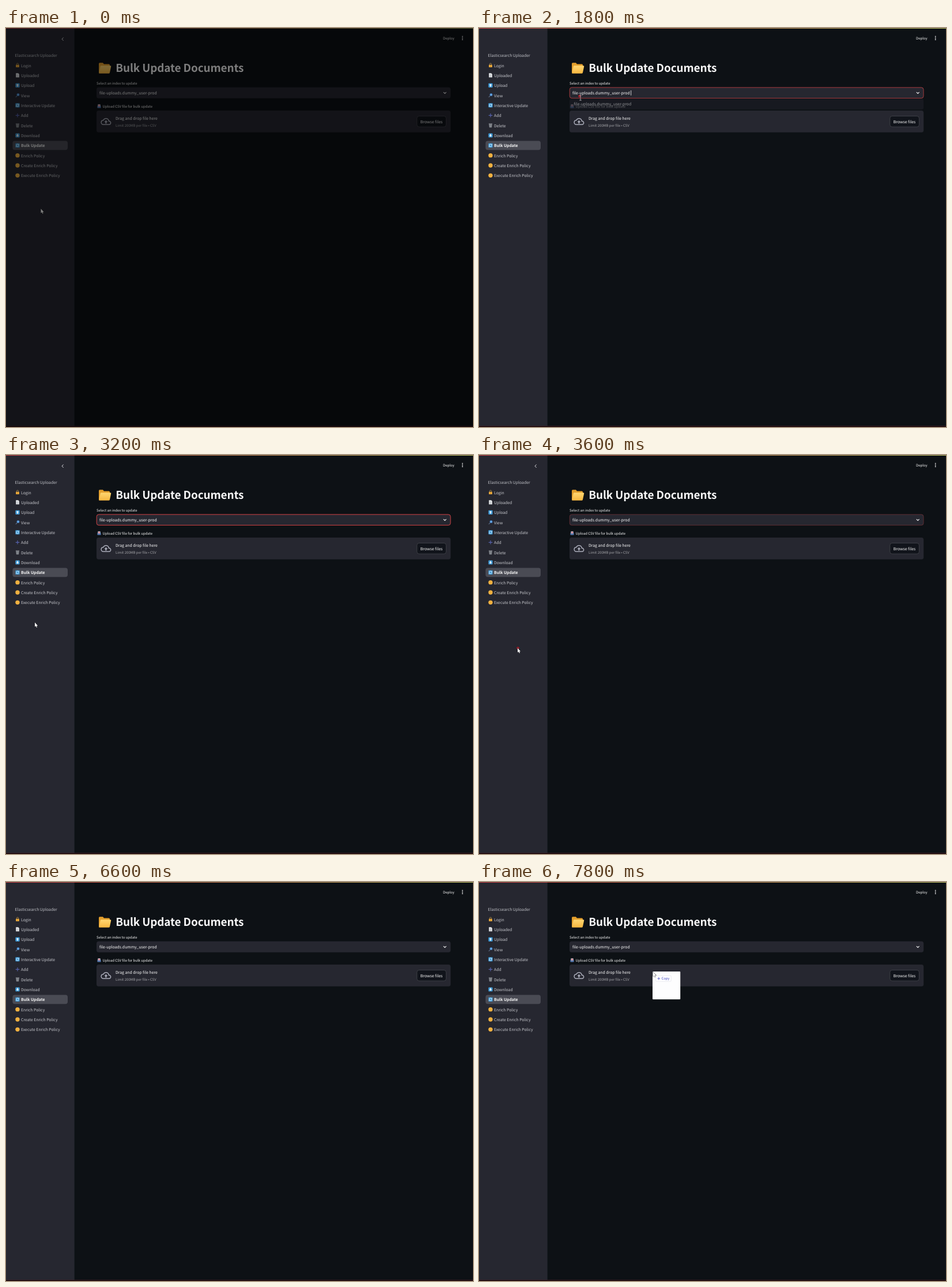
An HTML page with a canvas for the animation above (8000 ms loop, 810 by 691 pixels).

```html
<!DOCTYPE html>
<html lang="en">
<head>
<meta charset="utf-8">
<title>Bulk Update Documents</title>
<style>
html, body { margin: 0; width: 100%; height: 100%; overflow: hidden; background: #0d1115; }
canvas { display: block; width: 810px; height: 691px; }
</style>
</head>
<body>
<canvas id="stage" width="810" height="691"></canvas>
<script>
const ctx = document.getElementById('stage').getContext('2d');
const LOOP = 8000, STEP = 200;
const BG = '#0d1115', PANEL = '#262730', WHITE = '#fafafa', RED = '#ff4b4b';
const FAMILY = '"Noto Sans CJK JP", "Noto Sans CJK SC", "Noto Sans CJK", "Noto Sans", sans-serif';
const BODY = 7.68, SMALL = 6.72, TITLE = 21.1;
const INDEX = 'file-uploads.dummy_user-prod';
const MENU = [
  ['lock', 'Login'], ['page', 'Uploaded'], ['up', 'Upload'], ['lens', 'View'],
  ['sync', 'Interactive Update'], ['plus', 'Add'], ['bin', 'Delete'], ['down', 'Download'],
  ['sync', 'Bulk Update'], ['dot', 'Enrich Policy'], ['dot', 'Create Enrich Policy'],
  ['dot', 'Execute Enrich Policy']
];
const ACTIVE = 8;

// time, x, y of the pointer tip
const POINTER = [
  [0, 60.5, 313], [400, 60.5, 313], [600, 64, 304], [1000, 100, 236],
  [1400, 160, 136], [1600, 174, 119], [1800, 176, 121], [2200, 177, 117],
  [2400, 179.5, 112.5], [2600, 150, 150], [2800, 70, 208], [3200, 50, 290],
  [3600, 67, 334.5], [4000, 62, 348], [4200, 38, 346], [4400, 13, 342]
];
const DRAG = [[6800, 150, 174], [7000, 287, 134], [7400, 293, 141], [7600, 299, 151], [7800, 301, 155]];
const CLICKS = [[1800, 174.5, 118], [2200, 174.5, 119.5], [3600, 67.5, 334.5]];

function at(keys, t) {
  let i = keys.findIndex(k => k[0] > t);
  if (i < 0) i = keys.length;
  const a = keys[i - 1], b = keys[i] || a;
  const p = a === b ? 0 : (t - a[0]) / (b[0] - a[0]);
  return [a[1] + (b[1] - a[1]) * p, a[2] + (b[2] - a[2]) * p];
}

function text(str, x, y, size, color = WHITE, weight = 400) {
  // the CJK family draws its Latin letters about 1.117 times larger per em
  ctx.font = `${weight} ${size / 1.117}px ${FAMILY}`;
  ctx.textRendering = 'geometricPrecision';
  ctx.fillStyle = color;
  ctx.fillText(str, x, y);
}

function rect(x, y, w, h, color, r = 0) {
  ctx.fillStyle = color;
  ctx.beginPath();
  ctx.roundRect(x, y, w, h, r);
  ctx.fill();
}

function frame(x, y, w, h, color, r) {
  ctx.strokeStyle = color;
  ctx.lineWidth = 0.8;
  ctx.beginPath();
  ctx.roundRect(x, y, w, h, r);
  ctx.stroke();
}

function circle(x, y, r, color) {
  ctx.fillStyle = color;
  ctx.beginPath();
  ctx.arc(x, y, r, 0, 7);
  ctx.fill();
}

function line(d, color, width = 1) {
  ctx.strokeStyle = color;
  ctx.lineWidth = width;
  ctx.stroke(new Path2D(d));
}

function shape(d, color) {
  ctx.fillStyle = color;
  ctx.fill(new Path2D(d));
}

function placed(x, y, draw) {
  ctx.save();
  ctx.translate(x, y);
  draw();
  ctx.restore();
}

const tile = () => rect(-3.6, -3.6, 7.2, 7.2, '#3f9bd8', 1);
const icons = {
  lock() {
    line('M-1.7 -0.5V-1.8A1.7 1.7 0 0 1 1.7 -1.8V-0.5', '#a98a4c', 0.9);
    rect(-2.8, -0.8, 5.6, 4.3, '#f5b13d', 0.7);
    rect(-0.4, 0.6, 0.8, 1.5, '#6b4a16');
  },
  page() {
    shape('M-2.8 -3.6H1.2L2.9 -1.9V3.6H-2.8Z', '#e6e8ea');
    line('M-1.6 -1H1.7M-1.6 0.6H1.7M-1.6 2.2H1.7', '#9aa0a8', 0.5);
  },
  up() { tile(); shape('M0 -2.6L2.4 0H0.8V2.5H-0.8V0H-2.4Z', '#fff'); },
  down() { tile(); shape('M0 2.6L2.4 0H0.8V-2.5H-0.8V0H-2.4Z', '#fff'); },
  sync() {
    tile();
    line('M-2.2 -0.3A2.2 2.2 0 0 1 1.6 -1.5M2.2 0.3A2.2 2.2 0 0 1 -1.6 1.5', '#fff', 0.8);
    shape('M2.6 -2.4V-0.5H0.7ZM-2.6 2.4V0.5H-0.7Z', '#fff');
  },
  lens() {
    line('M-3.2 3.2L-0.6 0.7', '#5f6f86', 1.2);
    circle(1, -1, 2.5, '#3d6fb0');
    circle(1, -1, 1.7, '#6aaee6');
  },
  plus() { line('M-3.3 0H3.3M0 -3.3V3.3', '#5662ad', 1.2); },
  bin() {
    shape('M-2.7 -2H2.7L2.1 3.6H-2.1Z', '#8d9197');
    rect(-3.2, -3.2, 6.4, 1, '#a6aab0', 0.4);
    line('M-1 -1.2L-0.8 2.8M1 -1.2L0.8 2.8', '#55585f', 0.5);
  },
  dot() { circle(0, 0, 3.7, '#f0b140'); }
};

function sidebar(open) {
  rect(0, 0, 118.7, 691, PANEL);
  if (open) line('M99.6 16.5L97 19.2L99.6 21.9', '#e4e4e8', 1);
  text('Elasticsearch Uploader', 15.4, 50.2, BODY, '#bfc0c6');
  MENU.forEach(([icon, label], i) => {
    const y = 64.8 + 17.34 * i, active = i === ACTIVE;
    if (active) rect(11.4, y - 7.9, 95.6, 15.6, '#4a4b54', 4);
    placed(20, y - 0.2, icons[icon]);
    text(label, 26, y + 2.8, BODY, active ? WHITE : '#c6c7cc', active ? 600 : 400);
  });
}

function folder() {
  shape('M161 62Q161 60.3 162.5 60.3H168L170 62.4H178.5Q180 62.4 180 64V77H161Z', '#e39f2c');
  const g = ctx.createLinearGradient(0, 65, 0, 79);
  g.addColorStop(0, '#ffd772');
  g.addColorStop(1, '#f7b63f');
  shape('M165.2 65.3H181.2Q182.6 65.3 182.2 66.8L180 77.2Q179.6 78.7 178.2 78.7H162Q160.8 78.7 161.2 77.2L163.7 66.6Q164 65.3 165.2 65.3Z', g);
}

function cloud() {
  placed(164.4, 153, () => {
    ctx.scale(0.75, 0.75);
    const body = new Path2D('M19.35 10.04A7.49 7.49 0 0 0 12 4C9.11 4 6.6 5.64 5.35 8.04A5.99 5.99 0 0 0 0 14C0 17.31 2.69 20 6 20H19C21.76 20 24 17.76 24 15C24 12.36 21.95 10.22 19.35 10.04Z');
    shape('M8 13H10.5V16.5H13.5V13H16L12 9Z', '#a9abb8');
    ctx.clip(body);
    ctx.strokeStyle = '#a9abb8';
    ctx.lineWidth = 4;
    ctx.stroke(body);
  });
}

function tray() {
  placed(161.5, 135.4, () => {
    rect(-2.1, -3.1, 4.2, 4, '#d9dce8', 0.4);
    shape('M0 -3L1.6 -1.1H0.6V0.7H-0.6V-1.1H-1.6Z', '#d25a66');
    shape('M-3 -0.6H-1.6V0.8H1.6V-0.6H3V3.2H-3Z', '#5a7fb8');
  });
}

function page(border) {
  const top = ctx.createLinearGradient(0, 0, 810, 0);
  top.addColorStop(0, RED);
  top.addColorStop(1, '#fffd80');
  ctx.globalAlpha = 0.75;
  rect(0, 0, 810, 1, top);
  ctx.globalAlpha = 1;
  rect(0, 689, 810, 1, '#3a1a20');
  rect(0, 690, 810, 1, '#100405');

  text('Deploy', 758, 19.9, SMALL);
  for (const y of [14.6, 17.4, 20.2]) circle(791.7, y, 0.9, WHITE);
  folder();
  ctx.letterSpacing = '-0.1px';
  text('Bulk Update Documents', 190.2, 76, TITLE, WHITE, 700);
  ctx.letterSpacing = '0px';

  text('Select an index to update', 157, 97.6, SMALL);
  rect(157, 102.8, 614.2, 19, PANEL, 3.8);
  if (border) {
    ctx.globalAlpha = border;
    frame(157.2, 103, 613.8, 18.6, RED, 3.8);
    ctx.globalAlpha = 1;
  }
  text(INDEX, 162, 115, BODY);
  line('M758.8 111.2L761.2 113.5L763.6 111.2', WHITE, 1.1);

  tray();
  text('Upload CSV file for bulk update', 167.6, 137.8, SMALL);
  rect(157, 143, 614.2, 37.8, PANEL, 3.8);
  cloud();
  text('Drag and drop file here', 190, 159.4, BODY);
  text('Limit 200MB per file • CSV', 190, 171.2, SMALL, 'rgba(250,250,250,.6)');
  rect(712.6, 152.4, 51, 19, '#11141b', 3.8);
  frame(712.8, 152.6, 50.6, 18.6, 'rgba(250,250,250,.2)', 3.8);
  text('Browse files', 718.8, 164.7, BODY);
}

function dropdown(fade) {
  ctx.globalAlpha = fade < 1 ? 0.5 : 1;
  rect(157, 122.6, 614.2, 18.6, BG, 3.8);
  ctx.globalAlpha = fade;
  rect(157, 122.6, 614.2, 18.6, PANEL, 3.8);
  ctx.globalAlpha = Math.min(1, fade * 1.3);
  text(INDEX, 164.6, 134.1, BODY);
  ctx.globalAlpha = 1;
}

function arrow(x, y, fill, edge) {
  placed(x, y, () => {
    const d = 'M0 0V7.6L1.7 6.1L2.9 8.7L4.1 8.2L2.9 5.7H5.2Z';
    line(d + 'M0 0L5.2 5.7', edge, 0.8);
    shape(d, fill);
  });
}

function ibeam(x, y) {
  placed(x, y, () => line('M-1.8 -4.2H1.8M0 -4.2V4.2M-1.8 4.2H1.8', '#b9bac0', 0.8));
}

function ripples(t) {
  for (const [start, x, y] of CLICKS) {
    const k = (t - start) / STEP;
    if (k < 0 || k > 2) continue;
    ctx.globalAlpha = 0.8 - 0.35 * k;
    ctx.strokeStyle = '#d01824';
    ctx.lineWidth = k ? 1 : 1.8;
    ctx.beginPath();
    ctx.arc(x, y, 1.4 + 7.4 * k, 0, 7);
    ctx.stroke();
  }
  ctx.globalAlpha = 1;
}

function draggedFile(x, y) {
  rect(x, y, 48.2, 48.2, '#fdfdfe', 1);
  rect(x + 5.6, y + 7.2, 26.6, 10, '#fff', 1);
  frame(x + 5.6, y + 7.2, 26.6, 10, '#e6e6ee', 1);
  line(`M${x + 8.4} ${y + 12.2}h4.8m-2.4 -2.4v4.8`, '#4a4fc4', 0.8);
  text('Copy', x + 15.4, y + 14.4, 6.6, '#3c42c0');
  arrow(x + 1, y + 0.8, '#fff', '#202028');
}

function focusAlpha(t) {
  if (t < 1800 || t > 4000) return 0;
  if (t === 1800) return 0.75;
  if (t < 3600) return 1;
  return [0.35, 0.15, 0.05][(t - 3600) / STEP];
}

function draw(t) {
  ctx.globalAlpha = 1;
  rect(0, 0, 810, 691, BG);
  const shown = t < 4600, [x, y] = at(POINTER, t);
  sidebar(shown && x < 118.7);
  page(focusAlpha(t));
  if (t >= 1800 && t < 2600) dropdown(t === 1800 ? 0.42 : 1);
  if (t >= 1800 && t < 3400 && (t - 1800) % 1000 < 400) rect(263.3, 108, 0.8, 8.8, WHITE);
  ripples(t);
  if (shown) {
    if (x > 157 && y > 102 && y < 122) ibeam(x, y);
    else arrow(x, y, '#fff', '#15151a');
  }
  if (t >= DRAG[0][0]) draggedFile(...at(DRAG, t));
  if (t < STEP) rect(0, 0, 810, 690, 'rgba(0,0,0,.5)');
}

const began = performance.now();
function tick() {
  const t = (performance.now() - began) % LOOP;
  draw(Math.floor(t / STEP) * STEP);
  requestAnimationFrame(tick);
}
tick();
</script>
</body>
</html>
```
